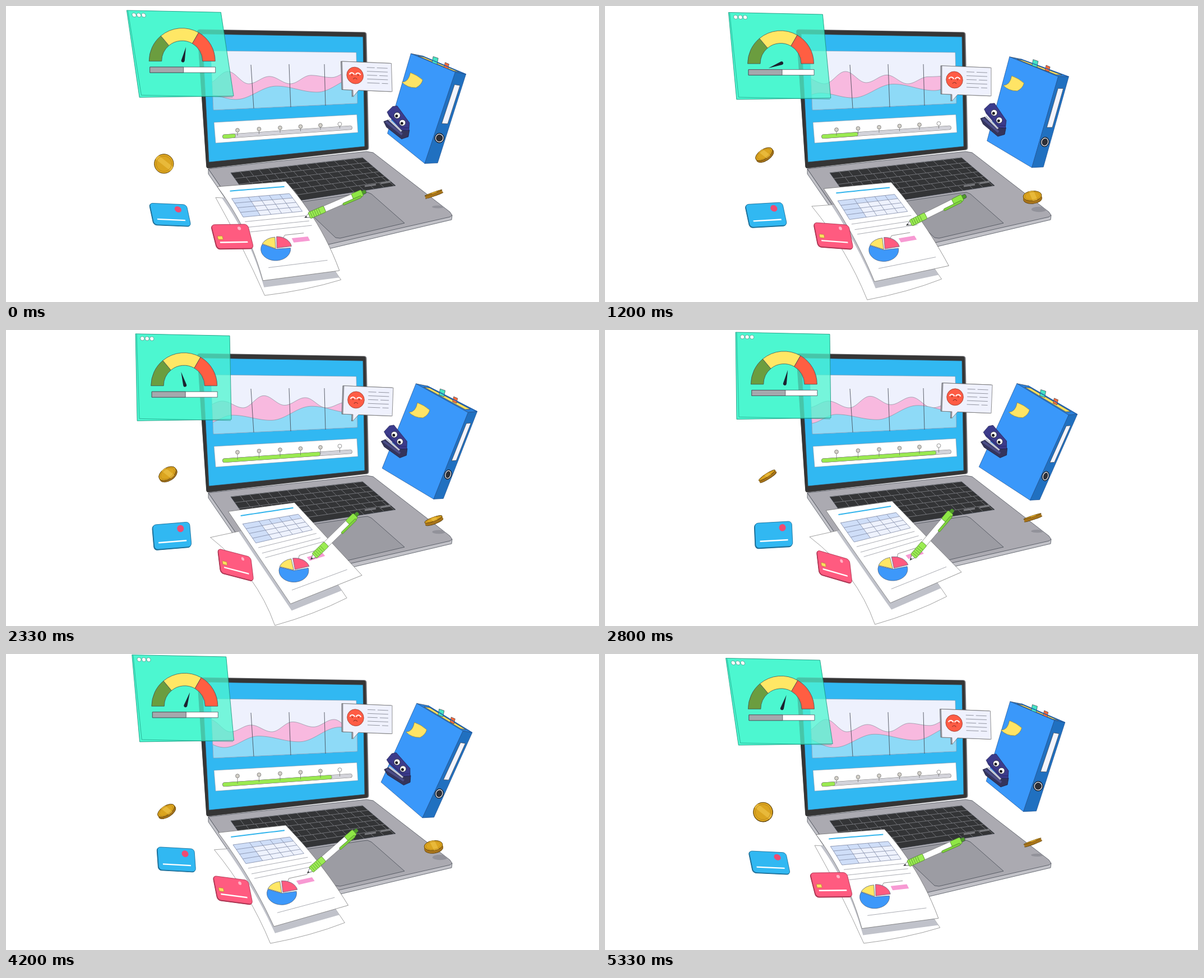
Recreate the animation shown at these times as an HTML page with a canvas. Size 1058x529 px, loop 5.39 s.

```html
<!DOCTYPE html>
<html lang="en">
<head>
<meta charset="utf-8">
<title>Floating office desk</title>
<style>
html, body { margin: 0; width: 100%; height: 100%; overflow: hidden; background: #fff; }
canvas { display: block; width: 1058px; height: 529px; }
</style>
</head>
<body>
<canvas id="stage" width="1058" height="529"></canvas>
<script>
const ctx = document.getElementById('stage').getContext('2d');
const LOOP = 5390, STEP = 200 / 3, INK = '#3a3f4a', TAU = Math.PI * 2, DEG = Math.PI / 180;
const GREEN = '77,247,209';
let t = 0;

// Once-per-loop swing around mid: a is the cosine part, b the sine part.
const sway = (mid, a, b = 0) =>
  mid + a * Math.cos(TAU * t / LOOP) + b * Math.sin(TAU * t / LOOP);
const clamp = (x, lo, hi) => Math.max(lo, Math.min(hi, x));
const ease = (from, to) => (1 - Math.cos(Math.PI * clamp((t - from) / (to - from), 0, 1))) / 2;
const add = (p, x, y) => [p[0] + x, p[1] + y];
const lerp = (p, q, s) => [p[0] + (q[0] - p[0]) * s, p[1] + (q[1] - p[1]) * s];

// Maps (u, v) in the unit square to a four-cornered, optionally bent sheet.
const quad = (tl, tr, br, bl, bend = 0) => (u, v) => {
  const b = 4 * v * (1 - v) * bend;
  return add(lerp(lerp(tl, bl, v), lerp(tr, br, v), u), b, -b * .6);
};
const patch = (q, u0, v0, u1, v1) => [q(u0, v0), q(u1, v0), q(u1, v1), q(u0, v1)];

function paint(fill, stroke = INK, width = .7) {
  if (fill) { ctx.fillStyle = fill; ctx.fill(); }
  if (stroke) { ctx.strokeStyle = stroke; ctx.lineWidth = width; ctx.stroke(); }
}
function trace(pts, close = true) {
  ctx.beginPath();
  pts.forEach(p => ctx.lineTo(...p));
  if (close) ctx.closePath();
}
function poly(pts, fill, stroke, width) { trace(pts); paint(fill, stroke, width); }
function line(pts, color = INK, width = .7) { trace(pts, false); paint(null, color, width); }
function oval(x, y, rx, ry, fill, stroke, width, turn = 0) {
  ctx.beginPath();
  ctx.ellipse(x, y, rx, ry, turn, 0, TAU);
  paint(fill, stroke, width);
}
function box(x, y, w, h, r, fill, stroke, width) {
  ctx.beginPath();
  ctx.roundRect(x, y, w, h, r);
  paint(fill, stroke, width);
}
function local(draw) { ctx.save(); draw(); ctx.restore(); }

// Draws in a w by h frame laid along the edges `top` and `left`.
function tilted(corner, top, left, w, h, draw) {
  local(() => {
    ctx.transform(top[0] / w, top[1] / w, left[0] / h, left[1] / h, ...corner);
    draw();
  });
}

// Curve through evenly spaced crests and hollows that travel to the right.
function ripple(first, gap, period, turn) {
  const pts = [];
  for (let k = 0; k < 14; k++) pts.push(turn(first + gap * k + period * t / LOOP, k));
  const out = [];
  for (let x = 362, i = 0; x <= 632; x += 2) {
    while (pts[i + 1][0] < x) i++;
    const [a, b] = [pts[i], pts[i + 1]], f = (x - a[0]) / (b[0] - a[0]);
    out.push([x, a[1] + (b[1] - a[1]) * (1 - Math.cos(f * Math.PI)) / 2]);
  }
  return out;
}

const BASE = [[361, 291], [643, 260], [655, 262], [792, 368], [796, 374], [792, 377], [470, 450]];

function laptop() {
  poly([[361, 291], [361, 300], [470, 459], [795, 382], [796, 374], [470, 450]], '#c2c2c8');
  poly(BASE, '#abaab1');
  const lid = [[345, 46], [638, 51], [642, 253], [361, 286]];
  poly(lid.map(p => add(p, 1, 0)), '#77777c', '#77777c', 9);
  poly(lid, '#353535', '#353535', 7.5);
  poly([[350, 50], [637, 55], [640, 251], [362, 279]], '#31b8f2');
  chart();
  progress();

  const keys = quad([401, 298], [636, 271], [695, 321], [445, 360]);
  poly(patch(keys, 0, 0, 1, 1), '#333436');
  for (let r = 0; r < 6; r++) {
    line([keys(0, r / 6), keys(1, r / 6)], '#85868b', .8);
    for (let c = 1; c < 14; c++) {
      const u = (c + r * .17) / 14;
      if (u < 1 && (r < 5 || c < 4 || c > 8)) line([keys(u, r / 6), keys(u, (r + 1) / 6)], '#85868b', .8);
    }
  }
  line([[640, 322], [660, 319]], '#77787c', 3);
  line([[668, 317], [686, 314]], '#77787c', 3);
  poly([[522, 351], [636, 334], [645, 333], [652, 336], [711, 388], [596, 415], [588, 414]], '#9c9ca3');
}

function chart() {
  const panel = [[365, 80], [625, 83], [627, 174], [370, 186]];
  const top = ripple(248, 37, 148, (x, k) => {
    if (k % 2) return [x, k % 4 === 1 ? 139 - Math.max(0, x - 440) * .08 : 139];
    const tall = clamp(1 - (x - 455) / 65, -1.6, 1);
    return [x, 122 - 5 * tall * (k % 4 ? -1 : 1)];
  });
  const low = ripple(265, 72.5, 145, (x, k) => [
    x < 410 ? 410 - (410 - x) * .64 : x,
    k % 2 ? 150 - (x - 420) * .11 : 167 - Math.max(0, x - 410) * .09]);
  const floor = [[632, 200], [362, 200]];
  local(() => {
    poly(panel, '#eef1fd', null);
    ctx.clip();
    poly([...top, ...floor], '#f8b9df', '#8a8f9c');
    poly([...low, ...floor], '#8edaf7', '#8a8f9c');
  });
  poly(panel, null, '#7d93a8', .6);
  line([[437, 105], [442, 183]], INK, .8);
  line([[505, 104], [508, 181]], INK, .8);
  line([[568, 104], [570, 178]], INK, .8);
}

function progress() {
  poly([[371, 208], [626, 194], [628, 226], [374, 245]], '#fff', '#7d93a8', .6);
  const done = ease(300, 3200) - ease(3900, 5400);
  const y = x => 233.2 - (x - 390) * .07;
  const bar = (x, color) => {
    line([[390, y(390)], [x, y(x)]], '#777', 7.6);
    line([[390, y(390)], [x, y(x)]], color, 6.4);
  };
  ctx.lineCap = 'round';
  bar(614, '#d3d3da');
  bar(406 + 190 * done, '#9aea50');
  ctx.lineCap = 'butt';
  for (let i = 0; i < 6; i++) {
    const x = 413 + 39 * i - .5 * i * i, top = 222 - 2.2 * i - 4.5 * done;
    line([[x, top], [x, y(x)]], '#666');
    oval(x, top, 3.4, 3.4, i < 5 ? '#d3d0c8' : '#fff', '#666');
  }
}

function gaugeFrame() {
  const tl = [sway(224.1, -8.7, -2.3), sway(6.2, 1.6, 5.1)];
  const bl = [sway(236.4, 1.7, -1.9), tl[1] + 155.5];
  return [tl, add(tl, 168, 3.5), add(bl, 168, -2.5), bl];
}

function gaugeWindow() {
  const [tl, tr, br, bl] = gaugeFrame();
  poly([tl, tr, br, bl], `rgba(${GREEN},.75)`, '#1b8f78', .8);
  tilted(tl, [168, 3.5], [bl[0] - tl[0], 155.5], 168, 154, () => {
    line([[2, 1], [4, 150], [167, 150]], '#1b9f85');
    for (const x of [12, 20.5, 29]) oval(x, 8, 3.6, 3.6, '#fff', '#3f8f80');
  });
  local(() => {
    ctx.translate(sway(316.6, -2.4, -2.7), sway(98.1, .5, 5));
    const sector = (a, b, color) => {
      ctx.beginPath();
      ctx.arc(0, 0, 59, a * DEG, b * DEG);
      ctx.arc(0, 0, 36.5, b * DEG, a * DEG, true);
      ctx.closePath();
      paint(color);
    };
    sector(-180, -130, '#6b9d3f');
    sector(-130, -60, '#ffe765');
    sector(-60, 0, '#ff5e42');
    box(-57.5, 10.5, 117, 10, 0, '#fff');
    box(-57.5, 10.5, 60, 10, 0, '#a5a8ad');
    // The needle rests to the right and drops back once per loop.
    ctx.translate(1.5, -1);
    ctx.rotate((18 - 138 * Math.exp(-(((t - 1403) / 785) ** 2))) * DEG);
    ctx.beginPath();
    ctx.moveTo(0, -25);
    ctx.lineTo(3, -1);
    ctx.arc(0, 0, 3, 0, Math.PI);
    ctx.closePath();
    paint('#1c2230', null);
  });
}

function bubble() {
  const x = sway(601.3, -1.8);
  tilted([x, sway(97.4, 1.6, 9.3)], [88, 3.5], [601 - x, 50.5], 88, 50, () => {
    const shape = [[0, 0], [88, 0], [88, 50], [28, 50], [18, 62], [18, 50], [0, 50]];
    poly(shape.map(p => add(p, -2, 0)), '#a3a6b2', '#555');
    poly(shape, '#eff1fd', '#666');
    oval(22.5, 24, 14.8, 14.8, '#ff5c45', '#8c3328');
    const arch = (x, y, r, color, width) => {
      ctx.beginPath();
      ctx.arc(x, y, r, 1.1 * Math.PI, 1.9 * Math.PI);
      paint(null, color, width);
    };
    for (const eye of [17, 28]) {
      arch(eye, 24, 4.5, '#fff', 2);
      oval(eye, 23.5, 1, 1, '#8c3328', null);
    }
    arch(22.5, 32, 3.5, '#8c3328', 1);
    for (let i = 0; i < 5; i++) {
      const y = 9 + 6.8 * i, gap = i % 2 ? 81 : 58 + 2 * i;
      line([[44, y], [gap, y]], '#8b8e99', .9);
      if (gap < 80) line([[gap + 4, y], [81, y]], '#8b8e99', .9);
    }
  });
}

function binder() {
  const tl = [sway(728.3, -5.9, -5.6), sway(90.5, -5.4, 1.3)];
  const tr = [sway(831.5, -11, -2.3), sway(136, -14, -7.3)];
  const br = [sway(773.4, -3.3, 9.4), sway(291.8, -11.3, -2.1)];
  const bl = [sway(674.3, 6.3, 6.4), sway(236.6, -8.8, 6)];
  const mid = add(tr, sway(-17.3, -1.7, -1.1), sway(-1.2, -2.5, 1.4));
  const foot = add(br, sway(-20, -3), 1);
  const back = add(tl, 20, 4);

  const tab = (s, size, color) => {
    const [x, y] = lerp(back, tr, s), half = size / 2;
    poly([[x - half, y - size], [x + half, y - size + 3], [x + half - 2, y + 5], [x - half - 2, y + 2]], color);
  };
  const top = quad(tl, back, tr, mid);
  poly([tl, back, tr, mid], '#2a7fd8');
  poly(patch(top, .25, .1, .8, .9), '#ffe05e');
  tab(.31, 9, '#45e3c4');
  tab(.57, 7, '#ff6a3a');
  line([back, tr], '#1d5fae', 1.5);
  poly([tl, mid, foot, bl], '#3a98fa', '#1d4f90');
  poly([mid, tr, br, foot], '#2070c0', '#1d4f90');

  const spine = quad(mid, tr, br, foot);
  poly(patch(spine, .3, .13, .8, .56), '#f2f4fd');
  const wide = (br[0] - foot[0]) * .36, [x, y] = spine(.5, .72);
  oval(x, y, wide, 8.6, '#2d2f36', '#16181d', 1, .3);
  oval(x, y, wide - 1.5, 7, null, '#dfe3ee', 1.3, .3);

  local(() => {
    ctx.translate(tl[0] + sway(0, -1, 4), tl[1] + 34);
    ctx.beginPath();
    ctx.moveTo(0, 0);
    ctx.quadraticCurveTo(12, 4, 22, 13);
    ctx.quadraticCurveTo(20, 22, 10, 27);
    ctx.quadraticCurveTo(-6, 27, -15, 17);
    ctx.quadraticCurveTo(-3, 17, 0, 0);
    paint('#ffe465', '#8d7b34');
  });
}

function stapler() {
  local(() => {
    ctx.translate(sway(695.6, 2.3, -1.7), sway(191.3, 4.3, -1.2));
    ctx.rotate(sway(-2, 2.2, 3.7) * DEG);
    poly([[-24, 11], [-16, 8], [12, 27], [22, 26], [20, 38], [8, 42], [-19, 21]], '#34345c', '#1b1b38');
    line([[-20, 11], [9, 34]], '#4a4c86', 4);
    line([[-15, 7], [8, 28]], '#c4c8d6', 3.5);
    poly([[-18, -6], [-8, -16], [0, -17], [22, 13], [21, 27], [8, 26], [-14, 2]], '#3c3b8b', '#1f1f4e');
    line([[-14, -1], [8, 22], [21, 22]], '#2c2c70', 1.2);
    for (const [x, y] of [[0, 0], [9.5, 13]]) {
      oval(x, y, 5.5, 5.5, '#fff', '#222');
      oval(x - 1, y + 1, 2.5, 2.5, '#17171f', null);
    }
  });
}

function backSheet() {
  const tl = [sway(369.4, 4.6, -1.3), sway(356.3, -14, 4)];
  const bl = [sway(471.5, -9.9, -2), sway(522, -4.7, 4)];
  const br = add(bl, sway(132, 4), sway(-39, 11));
  const curve = (a, b, x, y) => ctx.quadraticCurveTo(...add(lerp(a, b, .5), x, y), ...b);
  ctx.beginPath();
  ctx.moveTo(...tl);
  curve(tl, bl, sway(15, -11), sway(-8, 6));
  curve(bl, br, 6, 5);
  ctx.lineTo(br[0] - 95, br[1] - 140);
  ctx.closePath();
}

function papers() {
  const tl = [sway(386, -9, 5.8), sway(322.9, 0, 3.6)];
  const bl = [sway(483.9, -25.5, 1.3), sway(489.5, 1.3, 2.8)];
  const tr = add(tl, sway(120, 2), sway(-13, 3.6, 1));
  const br = add(bl, sway(131.7, 4.8), sway(-36.3, 18.4, 5));
  const q = quad(tl, tr, br, bl, sway(3.7, 4));
  const steps = [...Array(13).keys()].map(i => i / 12);
  const sheet = [...steps.map(v => q(1, v)), ...steps.map(v => q(0, 1 - v))];

  local(() => {
    backSheet();
    paint('#fff', '#777');
    ctx.clip();
    poly(sheet.map(p => add(p, 2, 12)), '#c0c2ca', null);
  });
  poly(sheet, '#fff', '#666');

  const row = (v, u0, u1, color = '#92959e', w = .8) =>
    line(steps.map(s => q(u0 + (u1 - u0) * s, v)), color, w);
  row(.06, .13, .92, '#31b4ec', 2);
  poly(patch(q, .08, .145, .91, .355), '#eef2fd', null);
  poly(patch(q, .08, .145, .91, .195), '#cfdef8', null);
  poly(patch(q, .08, .145, .32, .355), '#cfdef8', null);
  for (let i = 0; i < 5; i++) row(.145 + i * .0525, .08, .91, '#7f8aa5');
  for (const u of [.08, .32, .47, .62, .77, .91]) line([q(u, .145), q(u, .25), q(u, .355)], '#7f8aa5', .8);
  for (const v of [.405, .465, .515]) row(v, .07, .92);
  row(.885, .12, .9);
  line([q(.41, .65), q(.5, .585), q(.76, .585)], '#777', .8);
  poly(patch(q, .57, .625, .79, .67), '#f79ad3', null);

  const turn = sway(-10, 4, 1);
  const slice = (from, to, color, dx = 0, dy = 0) => {
    ctx.beginPath();
    ctx.moveTo(dx, dy);
    ctx.ellipse(dx, dy, 26.5, 20.5, 0, (from + turn) * DEG, (to + turn) * DEG);
    ctx.closePath();
    paint(color, '#4a5872');
  };
  local(() => {
    ctx.translate(...q(.3, .715));
    slice(0, 211, '#3d98fa');
    slice(211, 273, '#ffe765', 0, -1);
    slice(-85, -3, '#ff5b80', 2, -2);
  });
}

function pen() {
  local(() => {
    ctx.translate(sway(538.5, -5.7), sway(394.8, -16.7));
    ctx.rotate(sway(-36, 12.7, 7.5) * DEG);
    poly([[0, 0], [11, -4.5], [11, 4.5]], '#fff');
    poly([[0, 0], [4, -1.6], [4, 1.6]], '#333', null);
    box(110, -3.5, 9, 7, 2, '#4f9a2a');
    box(36, -5.5, 60, 11, 0, '#fff', '#777');
    box(93, -6, 19, 12, 2, '#8fe746', '#4b7b2c');
    box(9, -6, 30, 12, 2, '#9bec52', '#4b7b2c');
    for (let x = 13; x < 30; x += 4) line([[x, -5.5], [x, 5.5]], '#5f9f36', .9);
    box(72, 3.5, 36, 4, 2, '#7ed23c', '#4b7b2c');
  });
}

function card(corner, top, left, color, edge, draw) {
  tilted(corner, top, left, 66, 42, () => {
    box(-1, 1, 66, 42, 6, edge, edge, 1);
    box(0, 0, 66, 42, 6, color, edge, .8);
    line([[8, 31], [58, 31]], '#fff', 2.4);
    draw();
  });
}

function cards() {
  card([sway(260.9, -5, -10), sway(349.1, 3.1, 5.1)], [66, sway(-.7, 3.5, -3.8)],
    [sway(5.3, 3, 3), sway(41.5, -3)], '#31b8f2', '#1c6d96',
    () => oval(49, 10, 6, 6, '#ef4b72', null));
  card([sway(372, -6.1, 1.4), sway(391.7, -.9, -4.8)], [sway(61.7, 3.5), sway(8, -8.8, -1.9)],
    [sway(8, 3), 43], '#ff5b80', '#a8324f', () => {
      oval(49, 7, 3, 3, '#ffb3c5', null);
      box(6, 20, 9, 6, 1, '#ffe05e', '#a8803a');
    });
}

function coin(x, y, r, minor, turn, depth) {
  local(() => {
    ctx.translate(x, y);
    ctx.rotate(turn * DEG);
    const ry = Math.max(1, minor);
    for (let d = depth; d > 0; d -= .5) oval(0, d, r, ry, '#a8741a', d === depth ? '#5d4210' : null, 1);
    oval(0, 0, r, ry, '#dba520', '#5d4210', .9);
    ctx.clip();
    poly([[-9, -18], [0, -18], [12, 18], [3, 18]], '#e8b93a', null);
    oval(0, 0, r * .8, ry * .8, null, '#b98316', .7);
  });
}

function coins() {
  const spin = t / LOOP * 3 * Math.PI;
  coin(sway(285.3, -3.5, -1), sway(270.3, 11.6, -7.6), 17.2,
    17.2 * Math.abs(Math.cos(spin)), -33, Math.round(8 * Math.abs(Math.sin(spin))) / 2);

  const half = LOOP / 2, wobble = shift => TAU * (t + shift) / half;
  const minor = 9 * Math.abs(Math.sin(Math.PI * t / half));
  local(() => {
    trace(BASE);
    ctx.clip();
    oval(771 + minor * .4, 359 + minor * .5, 11 + minor * .3, 2.5 + minor * .25, '#92929a', null);
  });
  coin(762.5, 337.5 - 5.5 * Math.sin(wobble(300)), 16.5, minor,
    -13 - 8 * Math.cos(wobble(250)), 5);
}

function frame(now) {
  t = Math.floor((now % LOOP + 5) / STEP) * STEP % LOOP;
  ctx.fillStyle = '#fff';
  ctx.fillRect(0, 0, 1058, 529);
  ctx.lineJoin = 'round';
  poly(gaugeFrame(), `rgb(${GREEN})`, null); // keeps the glass at full colour beside the laptop
  laptop();
  coins();
  papers();
  pen();
  cards();
  gaugeWindow();
  bubble();
  binder();
  stapler();
  requestAnimationFrame(frame);
}
requestAnimationFrame(frame);
</script>
</body>
</html>
```
